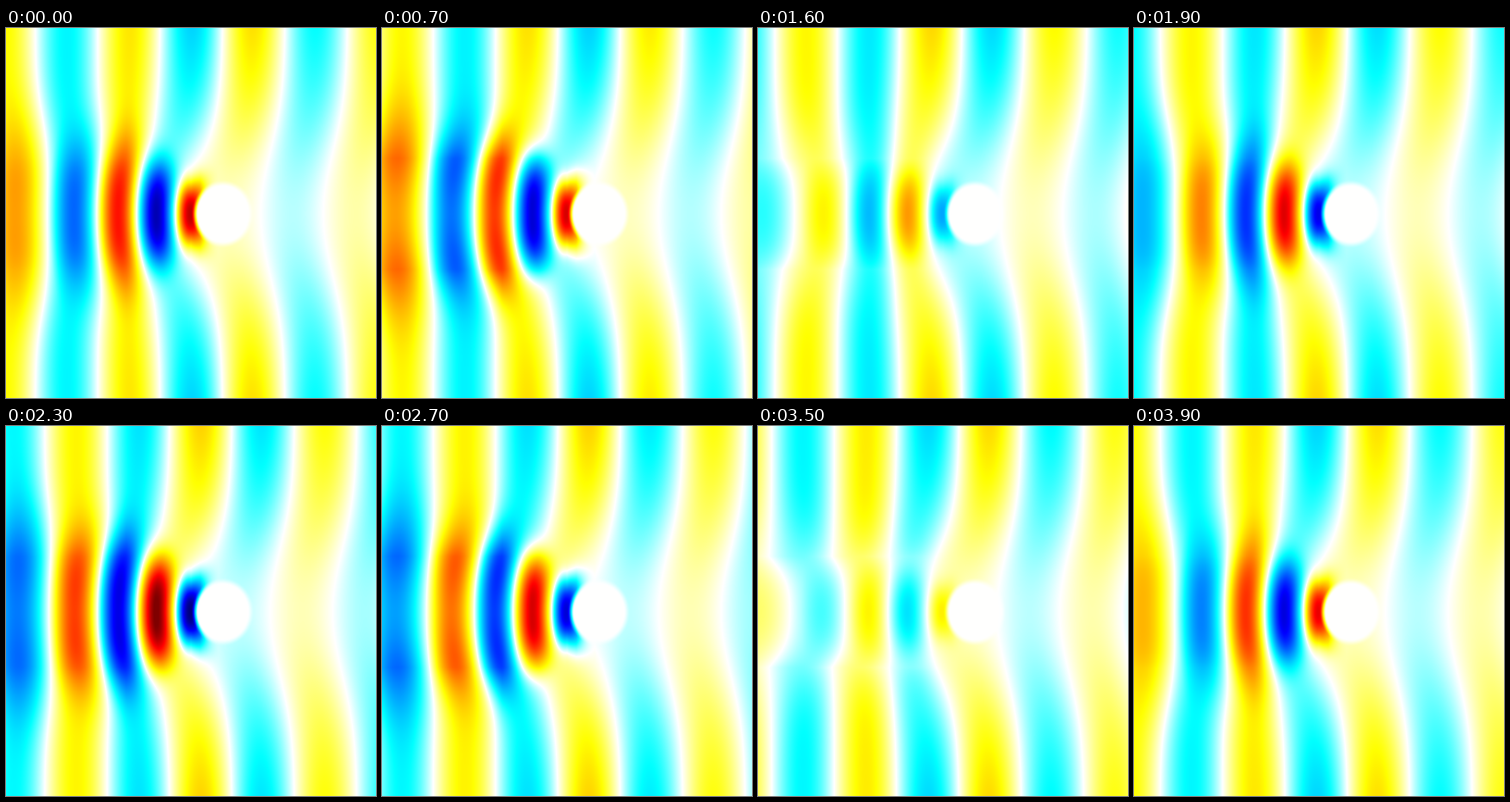
A matplotlib script that plays this animation: 400 by 400 pixels, repeating every 4000 ms.

```python
import numpy as np
import matplotlib.pyplot as plt
from matplotlib.animation import FuncAnimation
from matplotlib.colors import LinearSegmentedColormap

SIZE, FRAMES, INTERVAL = 400, 40, 100
CX, CY = 234.5, 201
WAVELENGTH, CREST = 135, 133

cmap = LinearSegmentedColormap.from_list("wave", [
    (0, (0, 0, 0.5)), (0.125, (0, 0, 1)), (0.375, (0, 1, 1)),
    (0.5, (1, 1, 1)),
    (0.625, (1, 1, 0)), (0.875, (1, 0, 0)), (1, (0.5, 0, 0))], N=1024)

axis = np.arange(SIZE) + 0.5
X, OFF = np.meshgrid(axis, np.abs(axis - CY))


def bell(d, width):
    return np.exp(-(d / width) ** 2)


def travelling():
    """Plane wave, dimmed and delayed in the shadow of the disc."""
    behind = 1 / (1 + np.exp(-(X - 150) / 15))
    depth = 0.85 - 0.2 * np.clip((X - 250) / 150, 0, 1)
    amp = 0.26 + 0.13 * bell(X - 220, 85)
    amp = amp * (1 - depth * behind * bell(OFF, 150))
    delay = 70 * behind * bell(OFF, 95)
    delay += 60 * bell(X - 200, 30) * bell(OFF, 60)
    phase = 2 * np.pi * (X - CREST) / WAVELENGTH + np.radians(delay)
    return amp * np.exp(1j * phase)


def standing():
    """Lobes on curved fronts that grow towards the disc."""
    front = CX - np.hypot(CX - X, 0.6 * OFF)
    lobe = np.interp(front, [-23, 47, 98, 183, 215], [0, 1, 2, 4, 5])
    height = np.minimum(0.43 + 0.6 * (front / 165) ** 2, 1)
    bend = (np.minimum(OFF, 60) / 46) ** 2
    amp = height * (1 + 0.2 * bend) * np.sin(np.pi * lobe)
    return amp * np.exp(1j * np.radians(30 + 10 * bend))


def standing_weight():
    reach = np.interp(X, [0, 70, 130, 200], [110, 80, 78, 32])
    return np.exp(-(OFF / reach) ** 2.5) * np.clip((230 - X) / 20, 0, 1)


def outside_disc():
    r = np.hypot((X - CX) / 31, OFF / 34)
    t = np.clip((r - 0.86) / 0.24, 0, 1)
    return t * t * (3 - 2 * t)


w = standing_weight()
field = ((1 - 0.7 * w) * travelling() + w * standing()) * outside_disc()


def wave(i):
    return (field * np.exp(-2j * np.pi * i / FRAMES)).real


fig = plt.figure(figsize=(4, 4), dpi=100)
ax = fig.add_axes([0, 0, 1, 1])
ax.axis("off")
image = ax.imshow(wave(0), cmap=cmap, vmin=-1, vmax=1, aspect="auto",
                  interpolation="nearest")


def update(i):
    image.set_data(wave(i))
    return [image]


anim = FuncAnimation(fig, update, frames=FRAMES, interval=INTERVAL,
                     repeat=True, repeat_delay=0)
plt.show()
```
